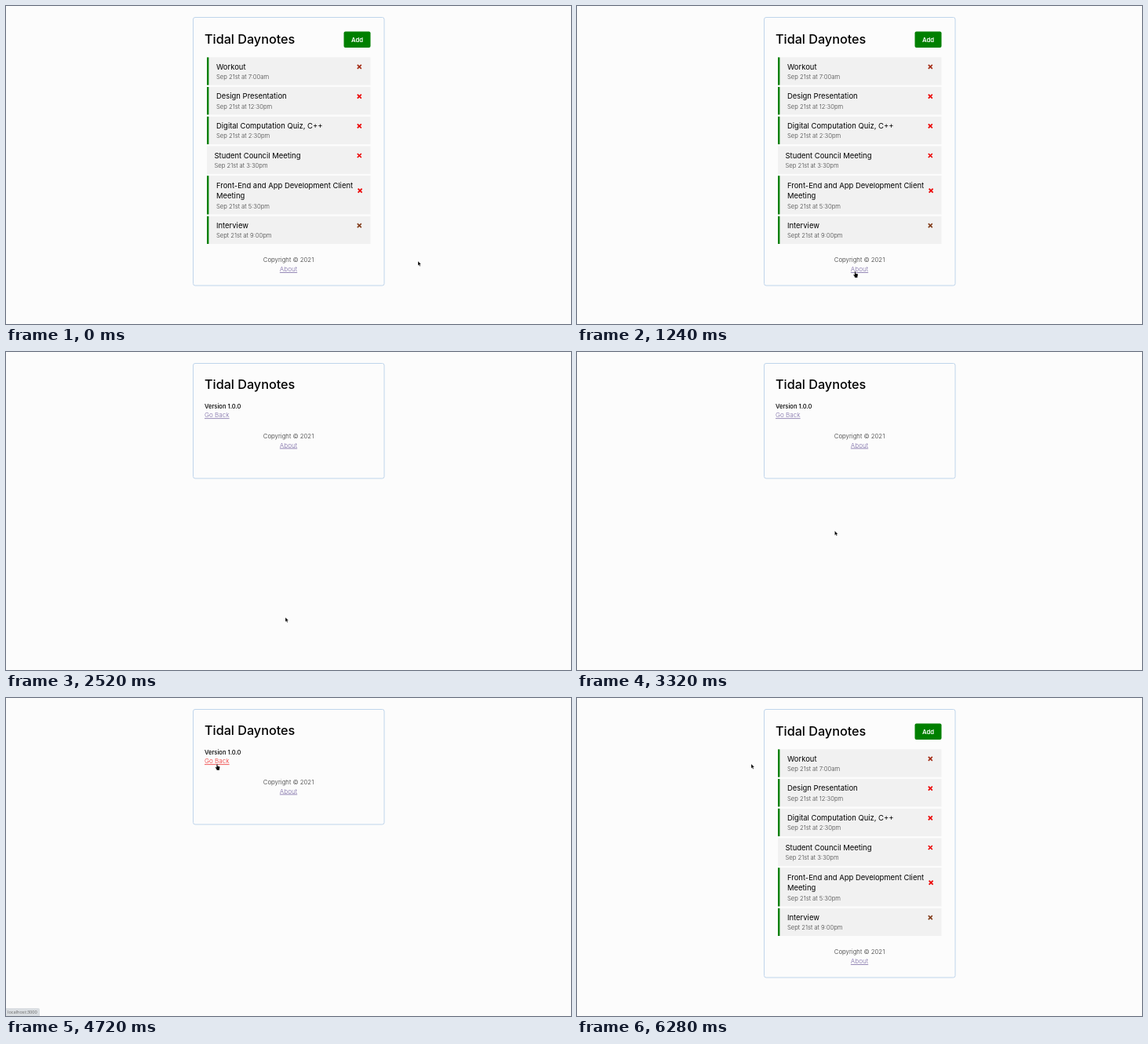
Write an HTML page that moves like this. It is 720x405 px and loops after 7160 ms.

```html
<!DOCTYPE html>
<html lang="en">
<head>
<meta charset="utf-8">
<title>Agenda</title>
<style>
  html, body { margin: 0; width: 100%; height: 100%; overflow: hidden; background: #fcfcfc; }
  svg { display: block; width: 100vw; height: 100vh; }
  text { font-family: Inter, sans-serif; fill: #000; }
  .heading { font-size: 16.2px; font-weight: 500; }
  .task { font-size: 9.45px; }
  .date { font-size: 7.65px; font-weight: 300; fill: #444; }
  .add { font-size: 7.7px; font-weight: 600; fill: #fff; }
  .version { font-size: 7.6px; font-weight: 500; }
  .copy { font-size: 7.8px; font-weight: 300; fill: #333; text-anchor: middle; }
  .link { font-size: 8.1px; font-weight: 300; fill: #7f6fa8; text-decoration: underline; }
  .middle { text-anchor: middle; }
  .link.active { fill: #e33; }
  .url { font: 5.6px "Open Sans", sans-serif; fill: #666; }
  .card { fill: none; stroke: #bfd5eb; }
</style>
</head>
<body>
<svg id="stage" viewBox="0 0 720 405">
  <g id="list"></g>
  <g id="about"></g>
  <g id="status">
    <path id="statusBox" fill="#dadee2"/>
    <text id="url" class="url" x="2" y="402.3"></text>
  </g>
  <path id="arrow" d="M0 0V5.6L1.3 4.5L2.2 6.5L3.2 6L2.3 4.1H4Z" stroke="#fff" stroke-width=".3"/>
  <path id="hand" d="M-.7 .6Q0-.4.7.6V2.7L3 3.2Q3.7 3.4 3.6 4.2L3 6.6V8H-.6V7L-2.3 4.6Q-2.3 3.6-1.3 4L-.7 4.6Z" stroke="#fff" stroke-width=".3"/>
</svg>
<script>
const LOOP = 7160, STEP = 40;
const $ = id => document.getElementById(id);

const label = (cls, x, y, text) => `<text class="${cls}" x="${x}" y="${y}">${text}</text>`;
const rect = (x, y, w, h, attrs) => `<rect x="${x}" y="${y}" width="${w}" height="${h}" ${attrs}/>`;
const card = height => rect(238.5, 14.5, 243.5, height, 'rx="2.5" class="card"');
const footer = y => label('copy', 360, y, 'Copyright © 2021') +
  label('link middle', 360, y + 11.8, 'About');

const tasks = [
  { y: 65.4, lines: ['Workout'], date: 'Sep 21st at 7:00am', cross: '#a52f18' },
  { y: 103.1, lines: ['Design Presentation'], date: 'Sep 21st at 12:30pm' },
  { y: 140.8, lines: ['Digital Computation Quiz, C++'], date: 'Sep 21st at 2:30pm' },
  { y: 178.5, lines: ['Student Council Meeting'], date: 'Sep 21st at 3:30pm', plain: true },
  { y: 216.2, lines: ['Front-End and App Development Client', 'Meeting'], date: 'Sep 21st at 5:30pm' },
  { y: 267.7, lines: ['Interview'], date: 'Sept 21st at 9:00pm', cross: '#84401f' }
];

function taskRow({ y, lines, date, cross = '#ec0505', plain }) {
  const extra = (lines.length - 1) * 13.9;
  const x = plain ? 265.5 : 268;
  const crossY = y + (extra ? 18.9 : 12);
  return rect(256, y, 208.5, 35.3 + extra, 'fill="#f1f1f1"') +
    (plain ? '' : rect(256, y, 2.4, 35.3 + extra, 'fill="#008000"')) +
    lines.map((line, i) => label('task', x, y + 15.3 + i * 13.9, line)).join('') +
    label('date', x, y + 27.6 + extra, date) +
    `<path d="M${extra ? 448.6 : 447.8} ${crossY - 2.5}l5 5m0-5l-5 5" stroke="${cross}" stroke-width="1.7"/>`;
}

$('list').innerHTML = card(341.5) + label('heading', 253, 48.3, 'Tidal Daynotes') +
  rect(430.5, 32.5, 34, 20.5, 'rx="2" fill="#008000"') + label('add middle', 447.5, 45.6, 'Add') +
  tasks.map(taskRow).join('') + footer(326.2);
$('about').innerHTML = card(146.5) + label('heading', 253, 47.3, 'Tidal Daynotes') +
  label('version', 253, 71.6, 'Version 1.0.0') +
  label('link', 253, 83.3, 'Go Back') + footer(109.7);

const aboutLink = $('list').querySelector('.link');
const backLink = $('about').querySelector('.link');

// Pointer stops: time, x, y
const path = [
  [40, 525, 325], [240, 490, 340], [480, 415, 371], [760, 357, 376], [1000, 355, 356], [1200, 354.5, 338],
  [2080, 354.5, 338], [2120, 356, 338], [2960, 356, 338], [3200, 343, 275], [3480, 309, 165], [3680, 289, 108],
  [3880, 273, 90], [4040, 269, 84], [5600, 269, 84], [5640, 266, 84], [6280, 222, 84]
];

function pointerAt(t) {
  const i = path.findIndex(p => p[0] > t);
  if (i === 0) return path[0].slice(1);
  if (i < 0) return path[path.length - 1].slice(1);
  const [t0, x0, y0] = path[i - 1], [t1, x1, y1] = path[i];
  const k = (t - t0) / (t1 - t0);
  return [x0 + (x1 - x0) * k, y0 + (y1 - y0) * k];
}

const clamp = v => Math.max(0, Math.min(1, v));
const within = (t, from, to) => t >= from && t < to;
const fade = (t, start, end) => Math.min(clamp((t - start) / 160), clamp((end - t) / 160));
const show = (id, visible) => $(id).style.display = visible ? '' : 'none';

function draw(t) {
  const onAbout = within(t, 2080, 4800);
  show('list', !onAbout);
  show('about', onAbout);
  aboutLink.classList.toggle('active', within(t, 2000, 2080));
  backLink.classList.toggle('active', within(t, 4720, 4800));

  const first = t < 3000, width = first ? 61 : 43;
  $('status').style.opacity = fade(t, first ? 1400 : 4080, first ? 2520 : 5320);
  $('statusBox').setAttribute('d', `M0 395H${width - 2}q2 0 2 2V405H0Z`);
  $('url').textContent = 'localhost:3000' + (first ? '/about' : '');

  const [x, y] = pointerAt(t);
  const pointing = within(t, 1160, 2120) || (t >= 4000 && x > 256);
  show('hand', pointing);
  show('arrow', !pointing);
  $(pointing ? 'hand' : 'arrow').setAttribute('transform', `translate(${x} ${y})`);
}

const start = performance.now();
function tick() {
  const t = (performance.now() - start) % LOOP;
  draw(Math.floor(t / STEP) * STEP);
  requestAnimationFrame(tick);
}
tick();
</script>
</body>
</html>
```
